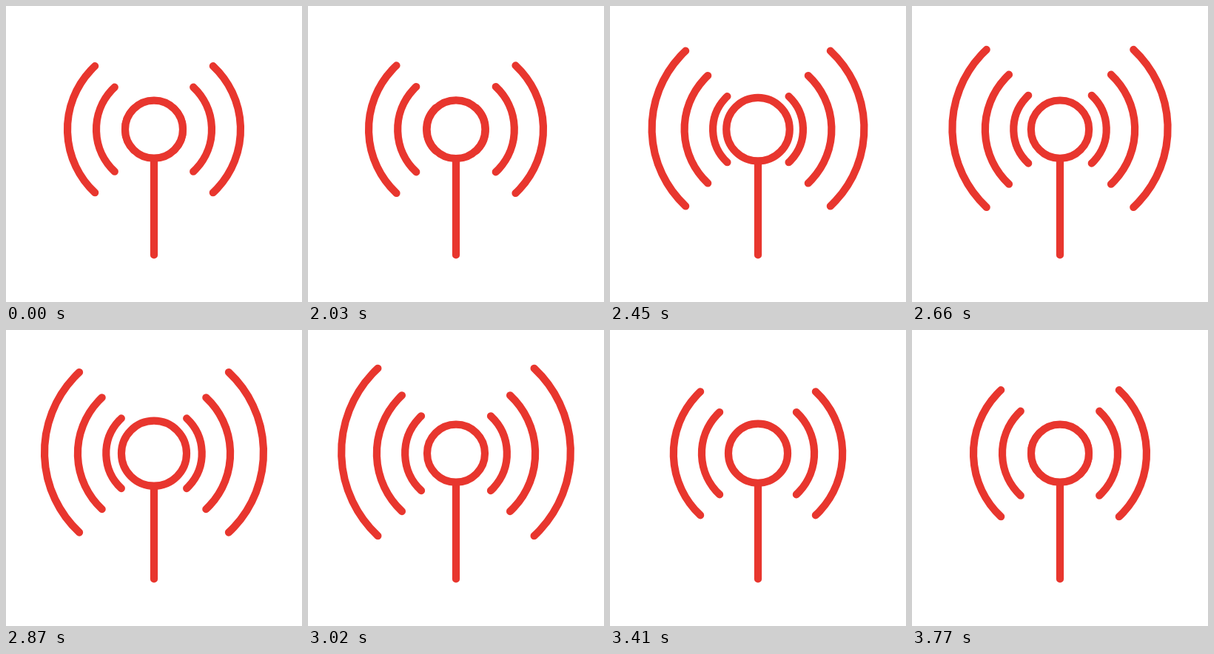
Recreate the animation shown at these times as an HTML page with a canvas. Size 400x400 px, loop 5060 ms.

```html
<!DOCTYPE html>
<html lang="en">
<head>
<meta charset="utf-8">
<title>Antenna</title>
<style>
  html, body { margin: 0; width: 100%; height: 100%; overflow: hidden; background: #fff; }
  canvas { display: block; width: 400px; height: 400px; }
</style>
</head>
<body>
<canvas id="stage"></canvas>
<script>
const LOOP = 5060, START = 2000, STEP = 30, ACTIVE = 1770;
const CX = 200, CY = 166.7, HALF_ANGLE = 47 * Math.PI / 180;
const PULSE = 340, PULSES = 5;

const canvas = document.getElementById('stage');
const ctx = canvas.getContext('2d');
const ratio = window.devicePixelRatio || 1;
canvas.width = canvas.height = 400 * ratio;

// Growth of the waves: quick swing out, slow drift, wind-up, snap back.
const swing = (lead, low, end) => [
  [0, 0], [30, 1], [215, 35], [430, 26.4], [660, 28.6], [870, 31],
  [1010 - lead, 38], [1080 - lead, 33], [1170 - lead, 9], [1290 - lead, low], [end, 0]
];

const waves = [
  { radius: 117, gain: 1, lift: 0.045, keys: swing(0, -4, 1620) },
  { radius: 78, gain: 0.81, lift: 0, keys: swing(31, -3, ACTIVE) },
  { radius: 39, gain: 0.83, lift: 0, keys: swing(31, -3, ACTIVE) }
];

// Smooth curve through the keys that never overshoots them.
function slopeAt(keys, i) {
  if (i === 0 || i === keys.length - 1) return 0;
  const rate = k => (keys[k + 1][1] - keys[k][1]) / (keys[k + 1][0] - keys[k][0]);
  const a = rate(i - 1), b = rate(i);
  return a * b <= 0 ? 0 : 2 * a * b / (a + b);
}

function sample(keys, t) {
  const last = keys.length - 1;
  if (t <= 0 || t >= keys[last][0]) return 0;
  const i = keys.findIndex(k => k[0] > t) - 1;
  const [t0, v0] = keys[i], [t1, v1] = keys[i + 1];
  const d = t1 - t0, u = (t - t0) / d, u2 = u * u, u3 = u2 * u;
  return v0 * (2 * u3 - 3 * u2 + 1) + v1 * (3 * u2 - 2 * u3)
    + d * slopeAt(keys, i) * (u3 - 2 * u2 + u)
    + d * slopeAt(keys, i + 1) * (u3 - u2);
}

function ringRadius(t) {
  if (t <= 0 || t >= PULSE * PULSES) return 39;
  return 39 + 2.6 * (1 - Math.cos(2 * Math.PI * t / PULSE));
}

function strokeArc(y, radius, from, to) {
  ctx.beginPath();
  ctx.arc(CX, y, radius, from, to);
  ctx.stroke();
}

function draw(t) {
  ctx.setTransform(ratio, 0, 0, ratio, 0, 0);
  ctx.fillStyle = '#fff';
  ctx.fillRect(0, 0, 400, 400);
  ctx.strokeStyle = '#e8362e';
  ctx.lineWidth = 10.2;
  ctx.lineCap = 'round';

  for (const { radius, gain, lift, keys } of waves) {
    const grow = sample(keys, t) * gain;
    const y = CY - grow * lift;
    for (const side of [0, Math.PI]) {
      strokeArc(y, radius + grow, side - HALF_ANGLE, side + HALF_ANGLE);
    }
  }

  ctx.beginPath();
  ctx.moveTo(CX, CY + 40);
  ctx.lineTo(CX, 336.5);
  ctx.stroke();

  // The white disc hides the waves and the stem inside the ring.
  ctx.beginPath();
  ctx.arc(CX, CY, ringRadius(t), 0, 2 * Math.PI);
  ctx.fill();
  ctx.stroke();
}

const begin = performance.now();

function tick() {
  const t = (performance.now() - begin) % LOOP - START;
  const stepped = Math.floor((t + 0.01) / STEP) * STEP;
  draw(Math.min(Math.max(stepped, 0), ACTIVE));
  requestAnimationFrame(tick);
}

tick();
</script>
</body>
</html>
```
